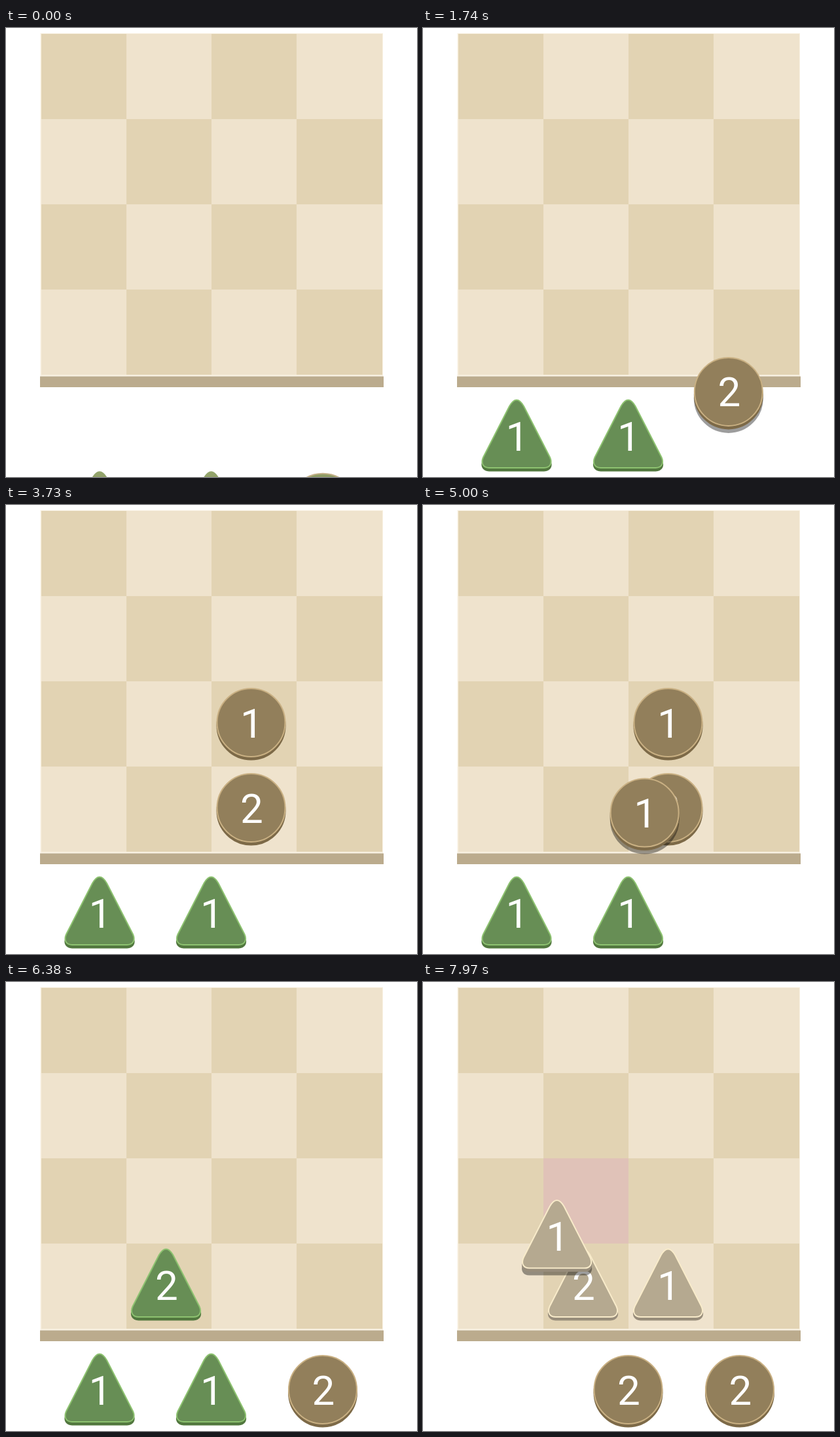
Write an HTML page that moves like this. It is 628 by 685 pixels and loops after 8 s.

```html
<!DOCTYPE html>
<html lang="en">
<head>
<meta charset="utf-8">
<title>Merging tiles</title>
<style>
  html, body { margin: 0; height: 100%; overflow: hidden; background: #fff; }
  svg { display: block; width: 100vw; height: 100vh; }
  text { font: 400 62px Roboto, "Open Sans", sans-serif; fill: #fff; text-anchor: middle; }
  path { stroke-width: 2; }
</style>
</head>
<body>
<svg viewBox="0 0 628 685">
  <rect x="52.5" y="8" width="523.5" height="523.5" fill="#f8f0e0"/>
  <g id="cells" shape-rendering="crispEdges"></g>
  <rect x="52" y="531.5" width="525" height="16.5" fill="#bbab8d"/>
  <g id="pieces"></g>
</svg>
<script>
const LOOP = 8000, FRAME = 88;
const LEFT = 54, TOP = 9, CELL = 130;
const MERGE = 5740, MERGED = 6010;
const SHAPES = {
  circle: 'M-52,0a52,52 0 1 0 104,0a52,52 0 1 0 -104,0z',
  triangle: 'M-11,-45Q0,-64 11,-45L51,33C55,42 51,49 42,49H-42C-51,49 -55,42 -51,33Z'
};
// face, rim, side
const SKINS = {
  brown: ['#927f5b', '#c9b083', '#7d6a48'],
  green: ['#678e55', '#8dc270', '#52783f'],
  grey: ['#b5a990', '#f8ebca', '#988d7b'],
  leaf: ['#93a26b', '#93a56c', '#7f8f58'],
  olive: ['#8f9d65', '#c4b189', '#7d6a48']
};
// A shape takes the next shape's skin while a match is armed
const LOOKS = {
  circle: { fresh: 'olive', usual: 'brown', armed: 'green', from: 5080, to: MERGED },
  triangle: { fresh: 'leaf', usual: 'green', armed: 'grey', from: 7970, to: LOOP }
};

const slot = i => ({ x: 143 + 170.5 * i, y: 622 });
const cell = (col, row) => ({ x: LEFT + CELL * (col + 0.5) - 4.5, y: TOP + CELL * (row + 0.5) - 2 });
const mix = (a, b, u) => a + (b - a) * u;
const mixPoint = (a, b, u, v = u) => ({ x: mix(a.x, b.x, u), y: mix(a.y, b.y, v) });
const glide = (s, rate, power) => 1 - Math.exp(-rate * s ** power);

// Motion advances in held frames: the count shown so far, starting at 1
const frames = (t0, t1) => Math.round((t1 - t0) / FRAME);
function step(t, t0, t1) {
  const n = frames(t0, t1);
  return 1 + Math.min(n, Math.floor((t - t0) / (t1 - t0) * n + 1e-6));
}

const drag = (t0, t1, col, row, aim = -22, land = t1) => ({ t0, t1, land, aim, to: cell(col, row) });
const piece = (shape, n, at, born, rest, move) =>
  ({ shape, n, home: slot(at), born, rest, move, end: shape === 'circle' && rest < MERGE ? MERGED : LOOP });

const pieces = [
  piece('circle', 2, 2, -10, 260, drag(1740, 2130, 2, 3)),
  piece('circle', 1, 2, 2410, 2590, drag(3230, 3510, 2, 2, 10, 3650)),
  piece('circle', 1, 2, 3970, 4250, drag(4810, 5450, 1, 3)),
  { shape: 'triangle', n: 2, home: cell(1, 3), born: MERGED, rest: 6200, pop: true, end: LOOP },
  piece('circle', 2, 2, 6110, 6380),
  piece('circle', 2, 1, 7230, 7420),
  piece('triangle', 1, 1, -10, 260, drag(6620, 6940, 2, 3)),
  piece('triangle', 1, 0, -10, 260, drag(7790, 7970, 1, 2, 10, LOOP))
];

function pose(p, t) {
  const { home, move } = p;
  if (move && t >= move.t0) {
    if (t < move.land) {
      const s = step(t, move.t0, move.t1);
      const aim = { x: move.to.x, y: move.to.y + move.aim };
      return { ...mixPoint(home, aim, glide(s, 0.17, 1.55), glide(s, 0.46, 1.25)), lifted: true };
    }
    const joins = p.end === MERGED && t >= MERGE;
    return mixPoint(move.to, cell(1, 3), joins ? step(t, MERGE, MERGED) / 4 : 0);
  }
  const left = 1 - step(t, p.born, p.rest) / (frames(p.born, p.rest) + 1);
  return p.pop
    ? { ...home, scale: 1 + 0.38 * left ** 2 }
    : { x: home.x, y: home.y + 195 * left ** 2 };
}

function skin({ shape }, t) {
  const look = LOOKS[shape];
  if (t < 80) return SKINS[look.fresh];
  return SKINS[t >= look.from && t < look.to ? look.armed : look.usual];
}

function make(parent, tag, attrs) {
  const el = document.createElementNS('http://www.w3.org/2000/svg', tag);
  set(el, attrs);
  return parent.appendChild(el);
}
function set(el, attrs) {
  for (const k in attrs) el.setAttribute(k, attrs[k]);
}
function show(el, on) {
  el.style.display = on ? '' : 'none';
}

const board = document.getElementById('cells');
for (let i = 0; i < 16; i++) {
  const col = i % 4, row = i >> 2;
  make(board, 'rect', {
    x: LEFT + col * CELL, y: TOP + row * CELL, width: CELL + (col === 3), height: CELL,
    fill: (col + row) % 2 ? '#efe3cd' : '#e2d3b3'
  });
}
const hover = make(board, 'rect', { width: CELL, height: CELL, fill: '#bf7d8b', opacity: 0.33 });

for (const p of pieces) {
  const d = SHAPES[p.shape];
  p.el = make(document.getElementById('pieces'), 'g', {});
  p.shadow = make(p.el, 'path', { d, stroke: '#000', opacity: 0.38, transform: 'translate(0 10)' });
  p.side = make(p.el, 'path', { d, transform: 'translate(0 4.5)' });
  p.face = make(p.el, 'path', { d });
  make(p.el, 'text', { x: 1, y: 22.5 }).textContent = p.n;
}

function cellIndex({ x, y }) {
  const col = Math.floor((x - LEFT) / CELL), row = Math.floor((y - TOP) / CELL);
  return col >= 0 && col < 4 && row >= 0 && row < 4 ? row * 4 + col : -1;
}

function draw(t) {
  const taken = new Set();
  let target = -1;
  for (const p of pieces) {
    const visible = t >= p.born && t < p.end;
    show(p.el, visible);
    if (!visible) continue;
    const at = pose(p, t), [face, rim, side] = skin(p, t);
    set(p.el, { transform: `translate(${at.x} ${at.y}) scale(${at.scale || 1})` });
    set(p.face, { fill: face, stroke: rim });
    set(p.side, { fill: side, stroke: side });
    show(p.shadow, at.lifted);
    if (at.lifted) target = cellIndex(at);
    else taken.add(cellIndex(at));
  }
  const lit = target >= 0 && !taken.has(target);
  show(hover, lit);
  if (lit) set(hover, { x: LEFT + target % 4 * CELL, y: TOP + (target >> 2) * CELL });
}

const start = performance.now();
function tick() {
  draw((performance.now() - start) % LOOP);
  requestAnimationFrame(tick);
}
tick();
</script>
</body>
</html>
```
